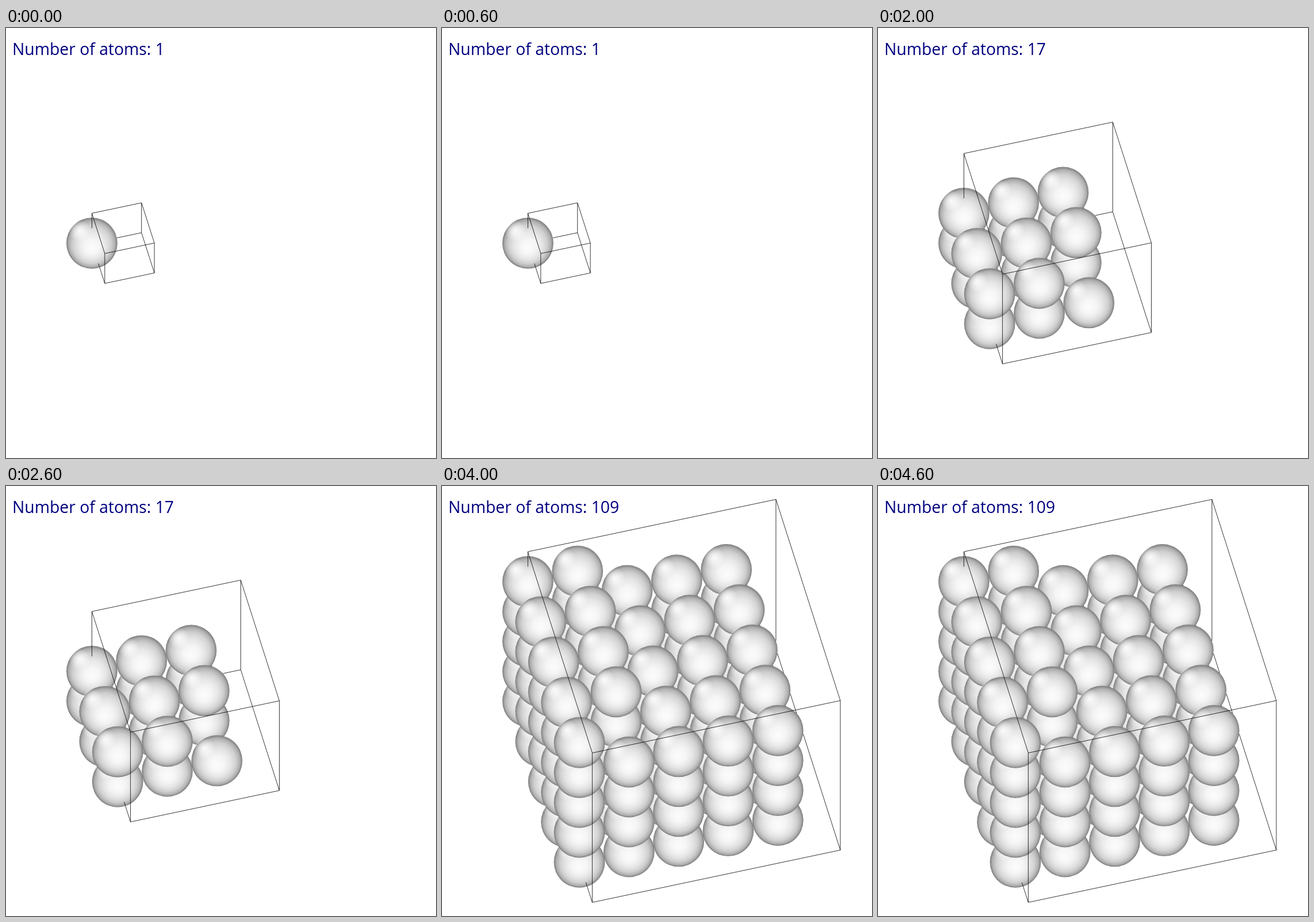
Animation of 748x748 px, one loop 5000 ms. Source, as an HTML page with a canvas:

```html
<!DOCTYPE html>
<html lang="en">
<head>
<meta charset="utf-8">
<title>Number of atoms</title>
<style>
  html, body { margin: 0; width: 100%; height: 100%; overflow: hidden; background: #fff; }
  canvas, svg { position: absolute; left: 0; top: 0; width: 748px; height: 748px; }
  text { font: 28.3px "Open Sans", "Noto Sans", sans-serif; fill: #000080; }
</style>
</head>
<body>
<canvas id="stage" width="748" height="748"></canvas>
<svg viewBox="0 0 748 748"><text id="label" x="11" y="47"></text></svg>
<script>
  const ctx = document.getElementById('stage').getContext('2d');
  const label = document.getElementById('label');

  const COUNTS = [1, 5, 17, 54, 109];
  const STEP = 1000;
  const R = 44.4;
  const ORIGIN = [149.4, 374.3, 0];
  // Lattice vectors on screen: x, y and depth towards the viewer
  const AXES = [[86.3, -18.2, -13.07], [22.4, 70, 50.3], [0, -52, 72.4]];

  const project = p => ORIGIN.map((o, d) =>
    o + p[0] * AXES[0][d] + p[1] * AXES[1][d] + p[2] * AXES[2][d]);

  // Cells fill layer by layer, and row by row within a layer
  function atoms(n, count) {
    return Array.from({ length: count }, (_, m) =>
      project([Math.floor(m / n) % n, m % n, Math.floor(m / (n * n))])
    ).sort((p, q) => p[2] - q[2]);
  }

  function disc(x, y, r, fill) {
    ctx.fillStyle = fill;
    ctx.beginPath();
    ctx.arc(x, y, r, 0, 2 * Math.PI);
    ctx.fill();
  }

  function gradient(circles, stops) {
    const g = ctx.createRadialGradient(...circles);
    stops.forEach(([at, color]) => g.addColorStop(at, color));
    return g;
  }

  function drawAtom([x, y]) {
    disc(x, y, R, gradient([x, y + R * 0.2, 0, x, y, R], [
      [0, '#fcfcfc'], [0.3, '#f5f5f5'], [0.55, '#e5e5e5'],
      [0.75, '#d0d0d0'], [0.9, '#b0b0b0'], [1, '#7c7c7c']
    ]));
    const hx = x - R * 0.48, hy = y - R * 0.48, hr = R * 0.42;
    disc(hx, hy, hr, gradient([hx, hy, 0, hx, hy, hr], [
      [0, 'rgba(255,255,255,.9)'], [0.4, 'rgba(255,255,255,.6)'], [1, 'rgba(255,255,255,0)']
    ]));
  }

  function hidden([x, y, z], list) {
    return list.some(([cx, cy, cz]) => {
      const h = R * R - (x - cx) ** 2 - (y - cy) ** 2;
      return h > 0 && z < cz + Math.sqrt(h);
    });
  }

  // Traces only the parts of an edge that no atom covers
  function traceEdge(from, to, list) {
    const steps = Math.ceil(2 * Math.hypot(to[0] - from[0], to[1] - from[1]));
    let drawing = false, last;
    for (let s = 0; s <= steps; s++) {
      const p = from.map((v, d) => v + (to[d] - v) * s / steps);
      const visible = !hidden(p, list);
      if (visible && !drawing) ctx.moveTo(p[0], p[1]);
      if (drawing && (!visible || s === steps)) {
        const end = visible ? p : last;
        ctx.lineTo(end[0], end[1]);
      }
      drawing = visible;
      last = p;
    }
  }

  function drawBox(n, list) {
    ctx.strokeStyle = '#000';
    ctx.lineWidth = 0.8;
    ctx.beginPath();
    for (let axis = 0; axis < 3; axis++) {
      for (const u of [0, n]) for (const v of [0, n]) {
        const from = [u, v];
        from.splice(axis, 0, 0);
        const to = from.slice();
        to[axis] = n;
        traceEdge(project(from), project(to), list);
      }
    }
    ctx.stroke();
  }

  function draw(index) {
    const n = index + 1;
    const list = atoms(n, COUNTS[index]);
    ctx.clearRect(0, 0, 748, 748);
    list.forEach(drawAtom);
    drawBox(n, list);
    label.textContent = 'Number of atoms: ' + COUNTS[index];
  }

  let shown = -1;
  function tick() {
    const index = Math.floor(performance.now() / STEP) % COUNTS.length;
    if (index !== shown) draw(shown = index);
    requestAnimationFrame(tick);
  }
  tick();
</script>
</body>
</html>
```
